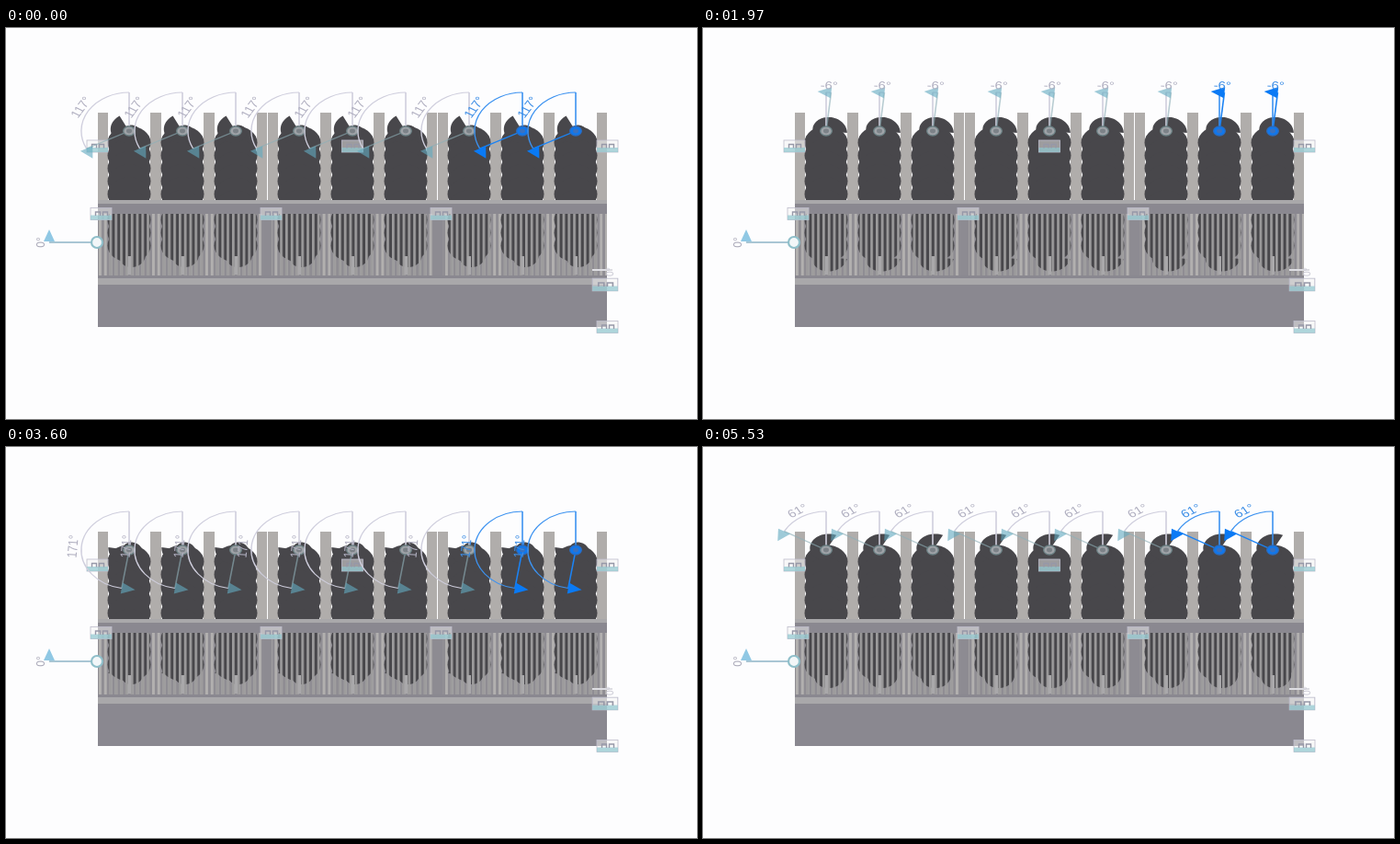
Animation, 752 px wide and 425 px high, one loop 5610 ms. Source, as an HTML page:

```html
<!DOCTYPE html>
<html lang="en">
<head>
<meta charset="utf-8">
<title>Rotating cams</title>
<style>
  html, body { margin: 0; width: 100%; height: 100%; overflow: hidden; background: #fdfdfe; }
  svg { display: block; width: 752px; height: 425px; }
  text { font: 12px "Liberation Sans", Arial, sans-serif; text-anchor: middle; dominant-baseline: central; }
  .dark { fill: #48474b; }
  .faint { --zero: #cfcedd; --arm: #8fb0b8a0; --head: #62aac09c; --label: #b0afc0; --hub: #9fa3a8; --core: #7c8288; --rim: #6b8084; }
  .vivid { --zero: #3c92f0; --arm: #1b83f4; --head: #0a7af5; --label: #3d8ee6; --hub: #0f78ee; --core: #3b72c0; --rim: #2a6cc0; }
</style>
</head>
<body>
<svg viewBox="0 0 752 425">
  <defs>
    <pattern id="bars" width="5.8" height="10" x="101" patternUnits="userSpaceOnUse">
      <rect width="2.9" height="10" fill="#b2b0af"/>
    </pattern>
    <pattern id="grille" width="5.8" height="10" x="101" patternUnits="userSpaceOnUse">
      <rect width="2.7" height="10" fill="#9c9b9c"/>
    </pattern>
    <g id="body"></g>
    <g id="topCam" transform="scale(1.24 1)"><path class="dark spin" id="camA"/></g>
    <g id="lowCam" transform="scale(1.24 1)"><path class="dark spin" id="camB"/></g>
    <g id="dial">
      <g transform="scale(1.24 1)">
        <path id="arc" fill="none" style="stroke:var(--zero)" stroke-width="1.1"/>
        <path d="M0 0V-42" style="stroke:var(--zero)" stroke-width="1.3"/>
        <g class="spin">
          <path d="M0 0V-42" style="stroke:var(--arm)" stroke-width="1.3"/>
          <path d="M0 -48V-36L-12 -42Z" style="fill:var(--head)"/>
        </g>
        <g id="turn"><text id="label" y="-49.5" style="fill:var(--label)"></text></g>
      </g>
      <ellipse rx="6.3" ry="5" style="fill:var(--hub);stroke:var(--rim)" stroke-width="1.3"/>
      <ellipse rx="3" ry="2.4" style="fill:var(--core)"/>
    </g>
    <g id="ground">
      <rect x="-11.5" y="-6.5" width="23" height="13" fill="#f4f4f4" fill-opacity=".5" stroke="#bdbccb" stroke-width=".8"/>
      <path d="M-11.5 1.5H11.5V6.5H-11.5Z" fill="#8fc6cf" fill-opacity=".7"/>
      <path d="M-6 2V-2H-1V2M2 2V-2H7V2" fill="none" stroke="#9698a8" stroke-width="1.4"/>
    </g>
  </defs>

  <g id="posts" fill="#b0adab"></g>
  <path d="M100 202H654V272H100Z" fill="#8f8d93"/>
  <path d="M100 202H654V269H100Z" fill="url(#bars)"/>
  <g id="cams"></g>
  <g id="grilles"></g>
  <path d="M280 202H289V270H280ZM465 202H475V270H465Z" fill="#8d8b92"/>
  <path d="M100 187H654V191H100ZM100 272H654V279H100Z" fill="#a9a8aa"/>
  <path d="M100 191H654V202H100ZM100 269H654V272H100ZM100 279H654V325H100Z" fill="#8a8890"/>

  <g id="grounds"></g>
  <path d="M47 233H93" stroke="#a9c6d4" stroke-width="2"/>
  <circle cx="99" cy="233" r="6" fill="#f2f6f8" stroke="#8fbfca" stroke-width="2.2"/>
  <path d="M638 263H660" stroke="#dddde2" stroke-width="2"/>
  <path d="M47 219L41 232H53Z" fill="#90c8e4"/>
  <text transform="translate(38 233) rotate(-90)" fill="#a9a8b8">0°</text>
  <text transform="translate(657 265) rotate(-90) scale(.85)" fill="#c6c5d0">0°</text>
  <g id="dials"></g>
</svg>
<script>
  const $ = id => document.getElementById(id);
  const range = (n, f) => Array.from({ length: n }, (_, i) => f(i));
  const fill = (id, n, f) => $(id).innerHTML = range(n, f).join("");
  const LOOP = 5610, STEP = 7.3;
  const pivot = i => 134 + 185 * Math.floor(i / 3) + 58 * (i % 3);

  // Time and unwrapped angle.
  const keys = [[0, 117], [870, 223], [1970, 354], [3070, 488], [3230, 495], [4130, 597], [4800, 695], [5530, 781]];

  // Moves from key to key in even, held steps.
  function angleAt(t) {
    const next = keys.findIndex(k => k[0] > t);
    const i = next < 0 ? keys.length - 1 : next - 1;
    const [t0, a0] = keys[i], [t1, a1] = keys[i + 1] ?? [LOOP, a0];
    const steps = Math.max(1, Math.round((a1 - a0) / STEP));
    const done = Math.floor(steps * (t - t0) / (t1 - t0)) / steps;
    return (Math.round(a0 + (a1 - a0) * done) + 180) % 360 - 180;
  }

  // Spiral outline shrinking steadily from its tip.
  function spiral(dir) {
    return "M" + range(73, i => {
      const r = 18.5 - i * 0.185, q = i * Math.PI / 36;
      return (r * Math.cos(q)).toFixed(2) + " " + (dir * r * Math.sin(q)).toFixed(2);
    }).join("L") + "Z";
  }

  $("camA").setAttribute("d", spiral(-1));
  $("camB").setAttribute("d", spiral(1));
  fill("body", 9, i => `<ellipse class="dark" cy="${124.5 + 14 * i}" rx="23.5" ry="18"/>`);
  fill("posts", 18, i =>
    `<rect x="${pivot(i >> 1) + (i % 2 ? 23 : -34)}" y="92" width="11" height="96"/>`);
  fill("cams", 9, i => {
    const x = pivot(i);
    return `<use href="#body" x="${x}"/><use href="#topCam" x="${x}" y="112"/><use href="#lowCam" x="${x}" y="249"/>`;
  });
  fill("grilles", 9, i => {
    const x = pivot(i);
    return `<rect x="${x - 23}" y="202" width="46" height="67" fill="url(#grille)"/>
      <rect x="${x - 1.5}" y="248" width="3.5" height="20" fill="#a9a8aa"/>`;
  });

  const ground = (x, y) => `<use href="#ground" x="${x}" y="${y}"/>`;
  fill("grounds", 3, i => ground(99.5 + 277.5 * i, 128.5) + ground(103.5 + 185 * i, 202));
  $("grounds").innerHTML += ground(654.5, 325) +
    `<use href="#ground" transform="translate(652 279) scale(1.2 1.05)"/>`;
  fill("dials", 9, i =>
    `<use href="#dial" x="${pivot(i)}" y="112" class="${i < 7 ? "faint" : "vivid"}"/>`);

  const spins = document.querySelectorAll(".spin");
  let shown = null;

  function draw(a) {
    const q = a * Math.PI / 180;
    spins.forEach(s => s.setAttribute("transform", `rotate(${-a})`));
    $("turn").setAttribute("transform", `rotate(${-a / 2})`);
    $("label").textContent = a + "°";
    $("arc").setAttribute("d",
      `M0 -42A42 42 0 0 ${a < 0 ? 1 : 0} ${-42 * Math.sin(q)} ${-42 * Math.cos(q)}`);
  }

  const start = performance.now();
  function frame() {
    const a = angleAt((performance.now() - start) % LOOP);
    if (a !== shown) draw(shown = a);
    requestAnimationFrame(frame);
  }
  frame();
</script>
</body>
</html>
```
